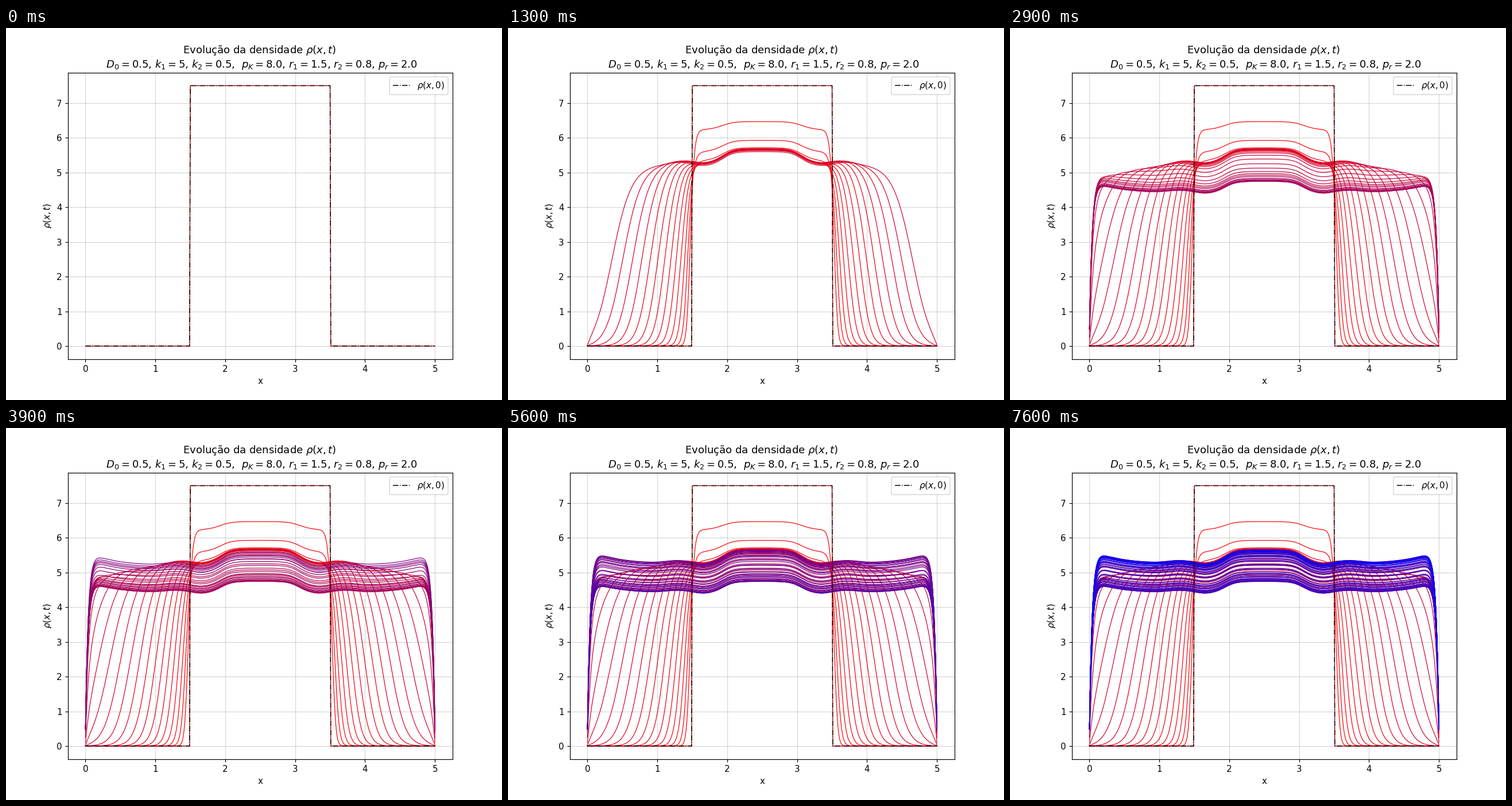
A matplotlib script that plays this animation: 864x648 px, repeating every 7.7 s.

```python
import numpy as np
import matplotlib.pyplot as plt
from matplotlib.animation import FuncAnimation

FRAMES = 77
T_END = 20.0
LENGTH = 5.0
STEPS = 100  # time steps per frame

x = np.linspace(0, LENGTH, 501)
edge = np.minimum(x, LENGTH - x)
mid = LENGTH / 2 - edge


def bump(s, center, width):
    return np.exp(-((s - center) / width) ** 2)


# Saturated density: central plateau, shoulders, absorbing ends
habitat = (5.27
           + 0.40 / (1 + np.exp((mid - 0.56) / 0.08))
           - 0.03 * bump(mid, 0.85, 0.15)
           + 0.08 * bump(mid, 1.2, 0.25)
           + 0.44 * np.exp(-edge / 0.38)) / 5.455
ends = 1 - 0.9 * np.exp(-edge / 0.04)

start = np.where((x > 1.5 - 1e-9) & (x < 3.5 + 1e-9), 7.5, 0.0)


def rate(t):
    return 1.5 + 0.8 * np.sin(np.pi * t)


def capacity(t):
    return 5 + 0.5 * np.sin(np.pi * t / 4)


def front(n):
    """Invasion front moving outwards, speeding up and widening."""
    k = n - 1
    width = 0.03 + 0.01 * k
    pos = 1.48 - 0.025 * k - 0.0054 * k * k
    z = (edge - pos) / width + 0.75
    return (1 + np.exp(-z)) ** -1.5


def solve():
    """Logistic growth, linear in the reciprocal density."""
    inv = habitat / 7.5
    dt = T_END / FRAMES / STEPS
    profiles = [start]
    for n in range(1, FRAMES):
        for i in range(STEPS):
            t = ((n - 1) * STEPS + i + 0.5) * dt
            inv = inv + dt * rate(t) * (1 / capacity(t) - inv)
        profiles.append(habitat * ends * front(n) / inv)
    return profiles


profiles = solve()

fig, ax = plt.subplots(figsize=(8, 6), dpi=108)
ax.set_xlim(-0.25, 5.25)
ax.set_ylim(-0.375, 7.875)
ax.grid(alpha=0.5)
ax.set_xlabel("x")
ax.set_ylabel(r"$\rho(x,t)$")
ax.set_title(
    "Evolução da densidade $\\rho(x,t)$ \n"
    " $D_0=0.5$, $k_1=5$, $k_2=0.5$,  $p_K=8.0$, $r_1=1.5$, $r_2=0.8$, $p_r=2.0$"
)

lines = []
for n, rho in enumerate(profiles):
    s = n / (FRAMES - 1)
    lines += ax.plot(x, rho, color=(1 - s, 0, s), lw=0.8)
ax.plot(x, start, "k-.", lw=1, zorder=3, label=r"$\rho(x,0)$")
ax.legend(loc="upper right")


def update(n):
    for i, line in enumerate(lines):
        line.set_visible(i <= n)
    return lines


anim = FuncAnimation(fig, update, frames=FRAMES, interval=100, repeat=True,
                     repeat_delay=0, blit=False)
plt.show()
```
